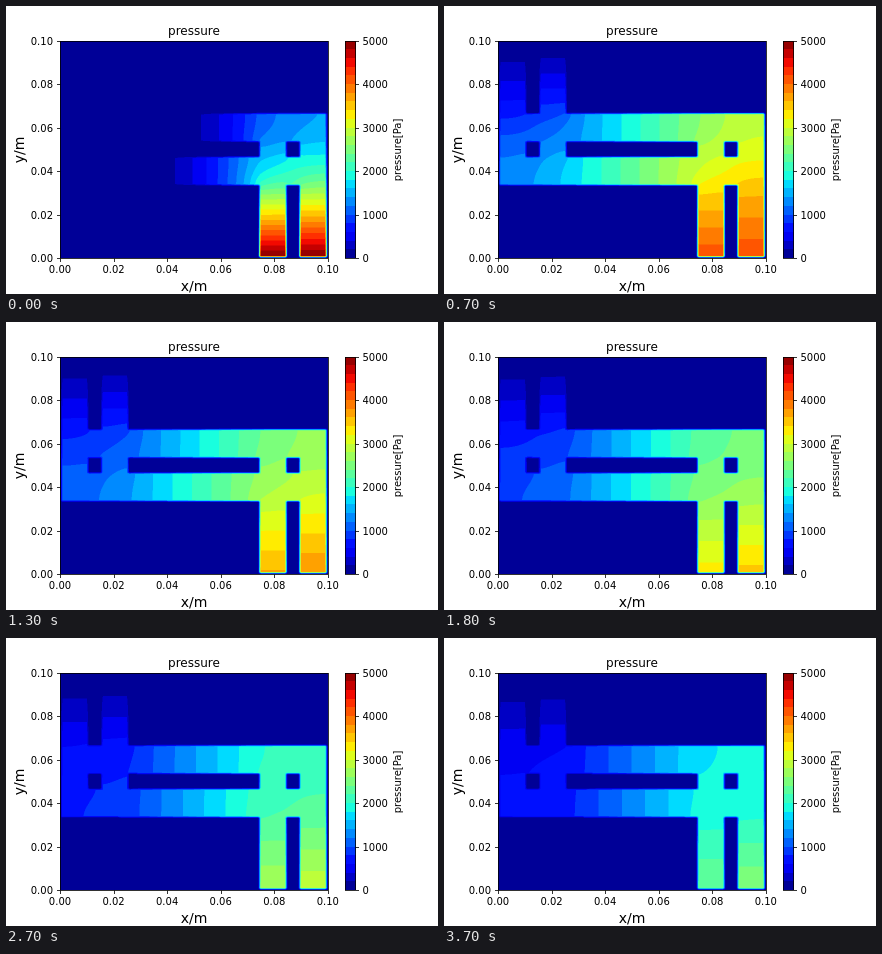
An HTML page with a canvas for the animation above (3.8 s loop, 432 by 288 pixels).

```html
<!DOCTYPE html>
<html lang="en">
<head>
<meta charset="utf-8">
<title>pressure</title>
<style>
  html, body { margin: 0; width: 100%; height: 100%; overflow: hidden; background: #fff; }
  canvas, svg { position: absolute; left: 0; top: 0; width: 432px; height: 288px; }
  text { font-family: "DejaVu Sans", sans-serif; font-size: 10px; fill: #000; }
  .mid { text-anchor: middle; }
  .end { text-anchor: end; }
  .title { font-size: 12px; }
  .axis { font-size: 14px; }
  path, .box { fill: none; stroke: #000; stroke-width: .8; }
</style>
</head>
<body>
<canvas id="view" width="432" height="288"></canvas>
<svg id="axes" viewBox="0 0 432 288">
  <rect class="box" x="54.5" y="35.5" width="268" height="217"/>
  <text class="mid title" x="188" y="29">pressure</text>
  <text class="mid axis" x="188" y="285">x/m</text>
  <text class="mid axis" transform="translate(18 144) rotate(-90)">y/m</text>
  <text class="mid" transform="translate(395 144) rotate(-90)">pressure[Pa]</text>
</svg>
<script>
const LEFT = 54, WIDTH = 267.84, TOP = 34.56, BOTTOM = 252, HEIGHT = BOTTOM - TOP;
const N = 101, FRAME = 100, FRAMES = 38, BANDS = 25, STEP = 200;
const ctx = document.getElementById('view').getContext('2d');
const svg = document.getElementById('axes');

// Piecewise linear lookup; each point is [x, a, b, ...]
function lerp(points, x) {
  let n = 1;
  while (n < points.length - 1 && x > points[n][0]) n++;
  const a = points[n - 1], b = points[n];
  const s = Math.min(1, Math.max(0, (x - a[0]) / (b[0] - a[0])));
  return a.slice(1).map((v, i) => v + (b[i + 1] - v) * s);
}

// Jet colour map, one colour per contour band
const JET = [
  [[0, 0], [.35, 0], [.66, 1], [.89, 1], [1, .5]],
  [[0, 0], [.125, 0], [.375, 1], [.64, 1], [.91, 0], [1, 0]],
  [[0, .5], [.11, 1], [.34, 1], [.65, 0], [1, 0]]
];
const colors = Array.from({ length: BANDS }, (_, i) =>
  JET.map(ch => Math.round(255 * lerp(ch, (i + .5) / BANDS)[0])));

// Seconds, inlet pressures left and right, conductance of ducts, outlets, junctions
const STATE = [
  [0, 5000, 5000, .55, .9, 1],
  [.7, 4130, 4160, .63, .9, .52],
  [1.3, 3620, 3790, .62, .92, .72],
  [1.8, 3290, 3470, .6, .94, .95],
  [2.3, 2980, 3150, .59, .96, 1.2],
  [3.1, 2580, 2760, .57, .98, 1.55],
  [3.7, 2400, 2580, .56, 1, 1.8]
];

const within = (v, a, b) => v >= a && v <= b;
const isOutlet = i => within(i, 1, 10) || within(i, 16, 25);
const isInlet = i => within(i, 75, 84) || within(i, 90, 99);

function isFluid(i, j) {
  if (within(j, 1, 33)) return isInlet(i);
  if (within(j, 67, 99)) return isOutlet(i);
  if (within(j, 47, 53)) return isInlet(i) || isOutlet(i);
  return within(j, 34, 66) && within(i, 1, 99);
}

const nodes = [], fluid = new Uint8Array(N * N);
for (let j = 0; j < N; j++)
  for (let i = 0; i < N; i++)
    if (isFluid(i, j)) {
      fluid[j * N + i] = 1;
      nodes.push(j * N + i);
    }

const SIDES = [1, -1, N, -N];
const free = nodes.filter(n => n >= 2 * N && n < 99 * N);

// Porous flow with a sink that holds back the filling front
function solve(p, t, rounds) {
  const [pl, pr, duct, outlet, junction] = lerp(STATE, t);
  const sink = .85 * Math.max(0, 1 - t / .5) ** 2;
  const k = new Float64Array(N * N);
  for (const n of nodes) {
    const i = n % N, j = (n - i) / N;
    k[n] = j < 34 ? 1 : j > 66 ? outlet : within(i, 26, 74) ? duct : junction;
    if (j === 1) p[n] = i < 87 ? pl : pr;
    if (j === 99) p[n] = 0;
  }
  const w = new Float64Array(free.length * 4), loss = new Float64Array(free.length);
  free.forEach((n, m) => {
    let sum = 0;
    SIDES.forEach((d, s) => {
      if (fluid[n + d]) sum += w[m * 4 + s] = 2 * k[n] * k[n + d] / (k[n] + k[n + d]);
    });
    for (let s = 0; s < 4; s++) w[m * 4 + s] /= sum;
    loss[m] = n >= 34 * N ? sink / sum : 0;
  });
  for (let r = 0; r < rounds; r++)
    for (let m = 0, q = 0; m < free.length; m++, q += 4) {
      const n = free[m];
      const v = w[q] * p[n + 1] + w[q + 1] * p[n - 1] + w[q + 2] * p[n + N] + w[q + 3] * p[n - N] - loss[m];
      p[n] = Math.max(0, p[n] + 1.96 * (v - p[n]));
    }
}

const fields = [];
const work = new Float64Array(N * N);
for (let f = 0; f < FRAMES; f++) {
  solve(work, f * FRAME / 1000, f ? 400 : 1000);
  fields.push(work.slice());
}

// Filled contours: bilinear samples, four per pixel
const X0 = 54, Y0 = 35, W = 268, H = 217;
const img = ctx.createImageData(W, H);

function bandAt(p, x, y) {
  const u = Math.min(99.999, Math.max(0, (x - LEFT) / WIDTH * 100));
  const v = Math.min(99.999, Math.max(0, (BOTTOM - y) / HEIGHT * 100));
  const i = u | 0, j = v | 0, a = u - i, b = v - j, n = j * N + i;
  const z = (p[n] * (1 - a) + p[n + 1] * a) * (1 - b) + (p[n + N] * (1 - a) + p[n + N + 1] * a) * b;
  return Math.min(BANDS - 1, z / STEP | 0);
}

function draw(f) {
  const p = fields[f], data = img.data;
  for (let y = 0, o = 0; y < H; y++)
    for (let x = 0; x < W; x++, o += 4) {
      let r = 0, g = 0, b = 0;
      for (let s = 0; s < 4; s++) {
        const c = colors[bandAt(p, X0 + x + .25 + (s & 1) * .5, Y0 + y + .25 + (s >> 1) * .5)];
        r += c[0]; g += c[1]; b += c[2];
      }
      data[o] = r / 4;
      data[o + 1] = g / 4;
      data[o + 2] = b / 4;
      data[o + 3] = 255;
    }
  ctx.putImageData(img, X0, Y0);
}

// Axes, ticks and colour bar
function add(tag, attrs, text) {
  const el = document.createElementNS('http://www.w3.org/2000/svg', tag);
  for (const name in attrs) el.setAttribute(name, attrs[name]);
  if (text) el.textContent = text;
  svg.append(el);
}
const snap = v => Math.round(v) + .5;

for (let i = 0; i <= 5; i++) {
  const x = snap(LEFT + WIDTH * i / 5), y = snap(BOTTOM - HEIGHT * i / 5);
  const label = (i * .02).toFixed(2);
  add('path', { d: `M${x} 252.5v3.5M54.5 ${y}h-3.5M349.5 ${y}h3.5` });
  add('text', { class: 'mid', x: LEFT + WIDTH * i / 5, y: 267 }, label);
  add('text', { class: 'end', x: 47, y: y + 3.4 }, label);
  add('text', { x: 356.5, y: y + 3.4 }, String(i * 1000));
}
add('rect', { class: 'box', x: 339.5, y: 35.5, width: 10, height: 217 });

colors.forEach((c, i) => {
  const y = Math.round(BOTTOM - HEIGHT * (i + 1) / BANDS);
  ctx.fillStyle = `rgb(${c})`;
  ctx.fillRect(339, y, 11, Math.round(BOTTOM - HEIGHT * i / BANDS) - y);
});

let shown = -1;
function tick(now) {
  const f = Math.floor(now / FRAME) % FRAMES;
  if (f !== shown) draw(shown = f);
  requestAnimationFrame(tick);
}
draw(shown = 0);
requestAnimationFrame(tick);
</script>
</body>
</html>
```
